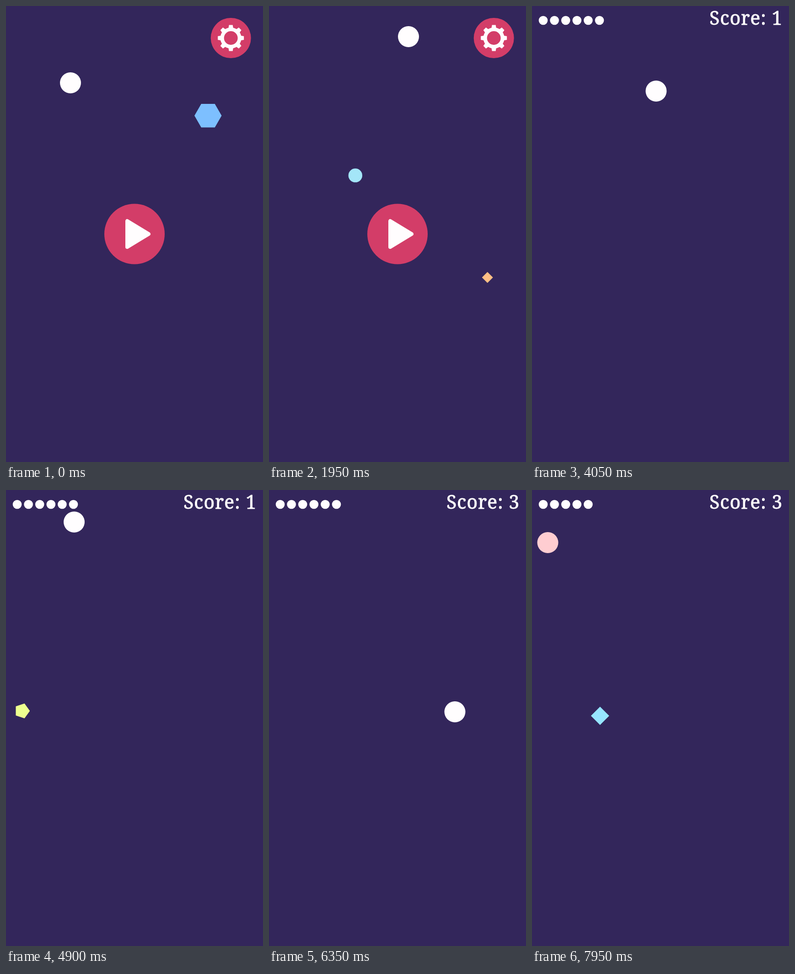
Recreate the animation shown at these times as an HTML page. Size 562x997 px, loop 8 s.

```html
<!DOCTYPE html>
<html lang="en">
<head>
<meta charset="utf-8">
<title>Bounce</title>
<style>
  html, body { margin: 0; width: 100%; height: 100%; overflow: hidden; background: #33265b; }
  svg { display: block; width: 100%; height: 100%; }
  text { font: 41px "Noto Serif", serif; letter-spacing: .9px; fill: #fffdfe; stroke: #fffdfe; stroke-width: .8; }
</style>
</head>
<body>
<svg viewBox="0 0 562 997">
  <rect width="562" height="997" fill="#33265b"/>
  <g id="shapes"></g>
  <circle id="ball" r="23"/>
  <g id="menu" fill="#fffdfe">
    <circle cx="281" cy="498.5" r="66" fill="#d33d68"/>
    <path d="M265 470V527L312 498.5Z" stroke="#fffdfe" stroke-width="8" stroke-linejoin="round"/>
    <g transform="translate(491.7 70)">
      <circle r="44" fill="#d33d68"/>
      <g id="teeth"></g>
      <circle r="19" fill="none" stroke="#fffdfe" stroke-width="8"/>
    </g>
  </g>
  <g id="hud" fill="#fffdfe">
    <g id="lives"></g>
    <text id="score" x="548" y="41" text-anchor="end"></text>
  </g>
</svg>
<script>
const LOOP = 8000, STEP = 50, GAME = 2100, DRAG = 0.00243;
const R = 23, W = 562, H = 997;
const $ = id => document.getElementById(id);

function add(parent, tag, attrs) {
  const el = document.createElementNS("http://www.w3.org/2000/svg", tag);
  for (const k in attrs) el.setAttribute(k, attrs[k]);
  return parent.appendChild(el);
}

function polygon(n, r) {
  return Array.from({ length: n }, (_, i) => {
    const a = i * 2 * Math.PI / n;
    return (r * Math.cos(a)).toFixed(2) + "," + (r * Math.sin(a)).toFixed(2);
  }).join(" ");
}

// sides 0 means a circle
const shapes = [
  { sides: 6, r: 29.7, x: 441.8, y: 239.8, color: "#7dbfff", from: -500, to: 1650 },
  { sides: 4, r: 12, x: 477.7, y: 593.5, color: "#ffbf85", from: 800, to: GAME },
  { sides: 0, r: 15.2, x: 188.8, y: 370.4, color: "#a4e6f8", from: 1600, to: GAME },
  { sides: 5, r: 17, x: 35.2, y: 483, color: "#eeff8f", from: 4350, to: 5550 },
  { sides: 4, r: 20, x: 148.8, y: 493.7, color: "#96e5ff", from: 6850, to: LOOP }
];
for (const s of shapes) {
  s.el = s.sides
    ? add($("shapes"), "polygon", { points: polygon(s.sides, s.r), fill: s.color })
    : add($("shapes"), "circle", { r: s.r, fill: s.color });
}
for (let i = 0; i < 8; i++) {
  add($("teeth"), "path", { d: "M-5.5 -20L-4 -28.5H4L5.5 -20Z", transform: `rotate(${i * 45})` });
}
const lives = Array.from({ length: 6 }, (_, i) =>
  add($("lives"), "circle", { cx: 24.5 + 24.6 * i, cy: 31.5, r: 9.8 }));

// Each leg heads for an unfolded point reached at time `at`; walls fold the path back.
const legs = [
  { t: 0, start: [141, 168], at: 1050, goal: [-353, -128] },
  { t: 1050, at: 1950, goal: [773, -21] },
  { t: GAME, start: [281, 498], at: 3150, goal: [313, 1264], drag: DRAG },
  { t: 3430, at: 4900, goal: [929, 70], drag: DRAG },
  { t: 5110, at: 6100, goal: [-4, 610], drag: DRAG },
  { t: 6110, at: 6350, goal: [406.5, 485], drag: DRAG },
  { t: 6850, at: 7650, goal: [442, 100], drag: DRAG },
  { t: 7650, at: 7950, goal: [11.5, 115], drag: DRAG }
];

function fold(v, size) {
  const span = size - 2 * R;
  const m = (((v - R) % (2 * span)) + 2 * span) % (2 * span);
  return R + (m > span ? 2 * span - m : m);
}

function along(leg, t) {
  const go = dt => leg.drag ? 1 - Math.exp(-leg.drag * dt) : dt;
  const f = go(t - leg.t) / go(leg.at - leg.t);
  return leg.start.map((p, i) => fold(p + (leg.goal[i] - p) * f, i ? H : W));
}

legs.forEach((leg, i) => { leg.start = leg.start || along(legs[i - 1], leg.t); });

const show = (el, on) => el.setAttribute("visibility", on ? "visible" : "hidden");

function draw(t) {
  const playing = t >= GAME;
  show($("menu"), !playing);
  show($("hud"), playing);

  for (const s of shapes) {
    show(s.el, t >= s.from && t < s.to);
    const scale = Math.max(0, Math.min(1, (t - s.from) / 150));
    s.el.setAttribute("transform", `translate(${s.x} ${s.y}) scale(${scale})`);
  }

  const [x, y] = along(legs.filter(leg => leg.t <= t).pop(), t);
  $("ball").setAttribute("cx", x);
  $("ball").setAttribute("cy", y);

  const hurt = t >= 7930;
  $("ball").setAttribute("fill", hurt ? "#ffcdd1" : "#fffdfe");
  lives[5].setAttribute("display", hurt ? "none" : "inline");
  $("score").textContent = "Score: " + [4000, 5550, 6200].filter(hit => t >= hit).length;
}

const begin = performance.now();
function tick() {
  const t = (performance.now() - begin) % LOOP;
  draw(Math.floor(t / STEP) * STEP);
  requestAnimationFrame(tick);
}
tick();
</script>
</body>
</html>
```
